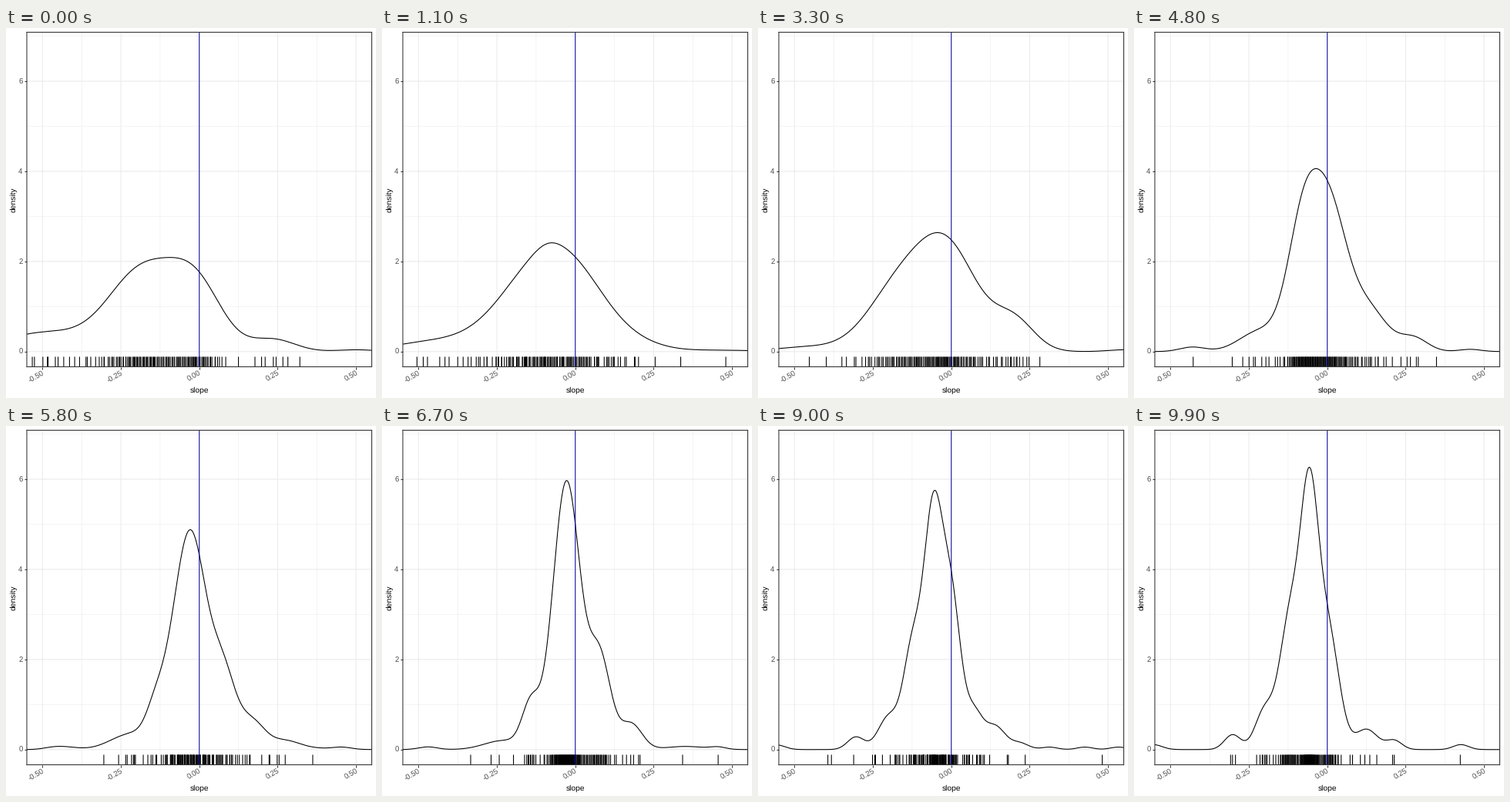
Recreate the animation shown at these times as a matplotlib script. Size 480x480 px, loop 10 s.

```python
import numpy as np
import matplotlib.pyplot as plt
from matplotlib.animation import FuncAnimation

SIZE, DPI = 480, 72
FRAMES, STEP = 100, 100
LEFT, RIGHT, TOP, BOTTOM = 27.0, 474.5, 5.5, 439.5
X_LIM, Y_MAX = 0.55, 6.75
SAMPLES = 136
LINE = 1.07
INK, GRID, EDGE = "#4d4d4d", "#ebebeb", "#333333"

plt.rcParams.update({"font.family": "Liberation Sans",
                     "text.hinting": "no_hinting",
                     "path.snap": False})
rng = np.random.default_rng(12)
xs = np.linspace(-X_LIM, X_LIM, 600)
grid = np.linspace(-0.7, 0.7, 6000)

# Each density is a sum of bell curves: (height, mean, spread).
broad = [(0.41, -0.5, 0.13), (1.8, -0.18, 0.11), (1.3, -0.008, 0.083),
         (0.27, 0.235, 0.07), (0.04, 0.5, 0.06)]
round_top = [(0.19, -0.44, 0.13), (2.36, -0.065, 0.143), (0.1, -0.09, 0.04),
             (0.03, 0.45, 0.12)]
shoulder = [(0.1, -0.46, 0.1), (1.33, -0.17, 0.1), (2.17, -0.01, 0.096),
            (0.66, 0.2, 0.065), (0.04, 0.55, 0.05)]
bell = [(0.1, -0.43, 0.04), (0.45, -0.215, 0.065), (2.75, -0.076, 0.051),
        (2.85, 0.01, 0.055), (0.92, 0.13, 0.06), (0.3, 0.275, 0.045),
        (0.05, 0.455, 0.035)]
spike = [(0.06, -0.47, 0.03), (0.2, -0.23, 0.06), (0.95, -0.142, 0.028),
         (5.95, -0.028, 0.0435), (2.0, 0.078, 0.035), (0.57, 0.178, 0.035),
         (0.07, 0.35, 0.06), (0.05, 0.455, 0.025)]
wavy = [(0.1, -0.56, 0.025), (0.23, -0.308, 0.027), (0.55, -0.205, 0.035),
        (1.65, -0.127, 0.027), (4.8, -0.055, 0.032), (3.6, 0.002, 0.027),
        (1.35, 0.073, 0.026), (0.65, 0.145, 0.032), (0.1, 0.235, 0.025),
        (0.11, 0.313, 0.025), (0.11, 0.533, 0.026)]
lumpy = [(0.11, -0.555, 0.028), (0.33, -0.302, 0.026), (0.85, -0.2, 0.03),
         (2.8, -0.12, 0.033), (5.35, -0.057, 0.0293), (2.45, 0.005, 0.034),
         (0.45, 0.125, 0.035), (0.2, 0.213, 0.025), (0.11, 0.426, 0.025)]
# The tallest moment is the spike, narrowed about its peak.
PEAK, K = -0.028, 1.135
tallest = [(h * K, PEAK + (m - PEAK) / K, s / K) for h, m, s in spike]


def density(bells, x):
    return sum(h * np.exp(-0.5 * ((x - m) / s) ** 2) for h, m, s in bells)


def sample(bells):
    """Seeded sample whose smoothed density is the given sum of bells."""
    band = min(s for _, _, s in bells)
    raw = []
    for h, m, s in bells:
        core = max(np.sqrt(s * s - band * band), 0.003)
        raw.append((h * s / core, m, core))
    cdf = np.cumsum(density(raw, grid))
    u = (np.arange(SAMPLES) + rng.random(SAMPLES)) / SAMPLES
    ticks = np.interp(u, cdf / cdf[-1], grid)
    # Shuffle neighbours so that ticks cross each other on the way.
    return ticks[np.argsort(np.arange(SAMPLES) + rng.normal(0, 5, SAMPLES))]


states = [(density(b, xs), sample(b)) for b in
          (broad, round_top, shoulder, bell, spike, tallest, wavy, lumpy)]

# time in ms -> position along the list of states
TIMES = [0, 1100, 2300, 3300, 4400, 4800, 5500, 6600, 6700, 7200, 8100, 9900]
PLACES = [0, 0.9, 1, 2, 2.79, 3, 3.25, 3.92, 4, 5, 6, 7]

fig = plt.figure(figsize=(SIZE / DPI, SIZE / DPI), dpi=DPI, facecolor="white")
ax = fig.add_axes([LEFT / SIZE, 1 - BOTTOM / SIZE,
                   (RIGHT - LEFT) / SIZE, (BOTTOM - TOP) / SIZE])
ax.set_xlim(-X_LIM, X_LIM)
ax.set_ylim(-0.05 * Y_MAX, 1.05 * Y_MAX)
x_ticks = np.arange(-0.5, 0.51, 0.25)
y_ticks = np.arange(0, 7, 2)
ax.set_xticks(x_ticks)
ax.set_xticks(x_ticks[:-1] + 0.125, minor=True)
ax.set_yticks(y_ticks)
ax.set_yticks(y_ticks + 1, minor=True)
ax.set_axisbelow(True)
ax.grid(which="major", color=GRID, lw=LINE)
ax.grid(which="minor", color=GRID, lw=LINE / 2)
ax.tick_params(which="major", length=2.75, width=LINE, color=EDGE,
               labelbottom=False, labelleft=False)
ax.tick_params(which="minor", length=0)
for spine in ax.spines.values():
    spine.set(color=EDGE, linewidth=LINE, zorder=6)


def label(x, y, text, size, color, **kw):
    fig.text(x / SIZE, 1 - y / SIZE, text, fontsize=size, color=color,
             va="baseline", rotation_mode="anchor", **kw)


mid_x, mid_y = (LEFT + RIGHT) / 2, (TOP + BOTTOM) / 2
x_unit = (RIGHT - LEFT) / (2 * X_LIM)
y_unit = (BOTTOM - TOP) / (1.1 * Y_MAX)
for v in x_ticks:
    label(mid_x + v * x_unit + 3.5, 450, f"{v:.2f}", 9.6, INK,
          ha="right", rotation=30)
for v in y_ticks:
    label(21.5, BOTTOM - (v + 0.05 * Y_MAX) * y_unit + 3.4, str(v), 9.6, INK,
          ha="right")
label(mid_x, 473, "slope", 10.2, "black", ha="center")
label(12.3, mid_y, "density", 10.2, "black", ha="center", rotation=90)

curve, = ax.plot([], [], color="black", lw=LINE, zorder=3)
rug = ax.vlines([], 0, 0.03, color="black", lw=LINE, zorder=4,
                transform=ax.get_xaxis_transform())
ax.axvline(0, color="blue", lw=LINE, zorder=5)


def update(frame):
    place = np.interp(frame * STEP, TIMES, PLACES)
    i = min(int(place), len(states) - 2)
    w = place - i
    height, ticks = ((1 - w) * a + w * b for a, b in zip(states[i], states[i + 1]))
    curve.set_data(xs, height)
    rug.set_segments([[(x, 0), (x, 0.03)] for x in ticks])
    return curve, rug


anim = FuncAnimation(fig, update, frames=FRAMES, interval=STEP,
                     repeat=True, repeat_delay=0, blit=False)
plt.show()
```
